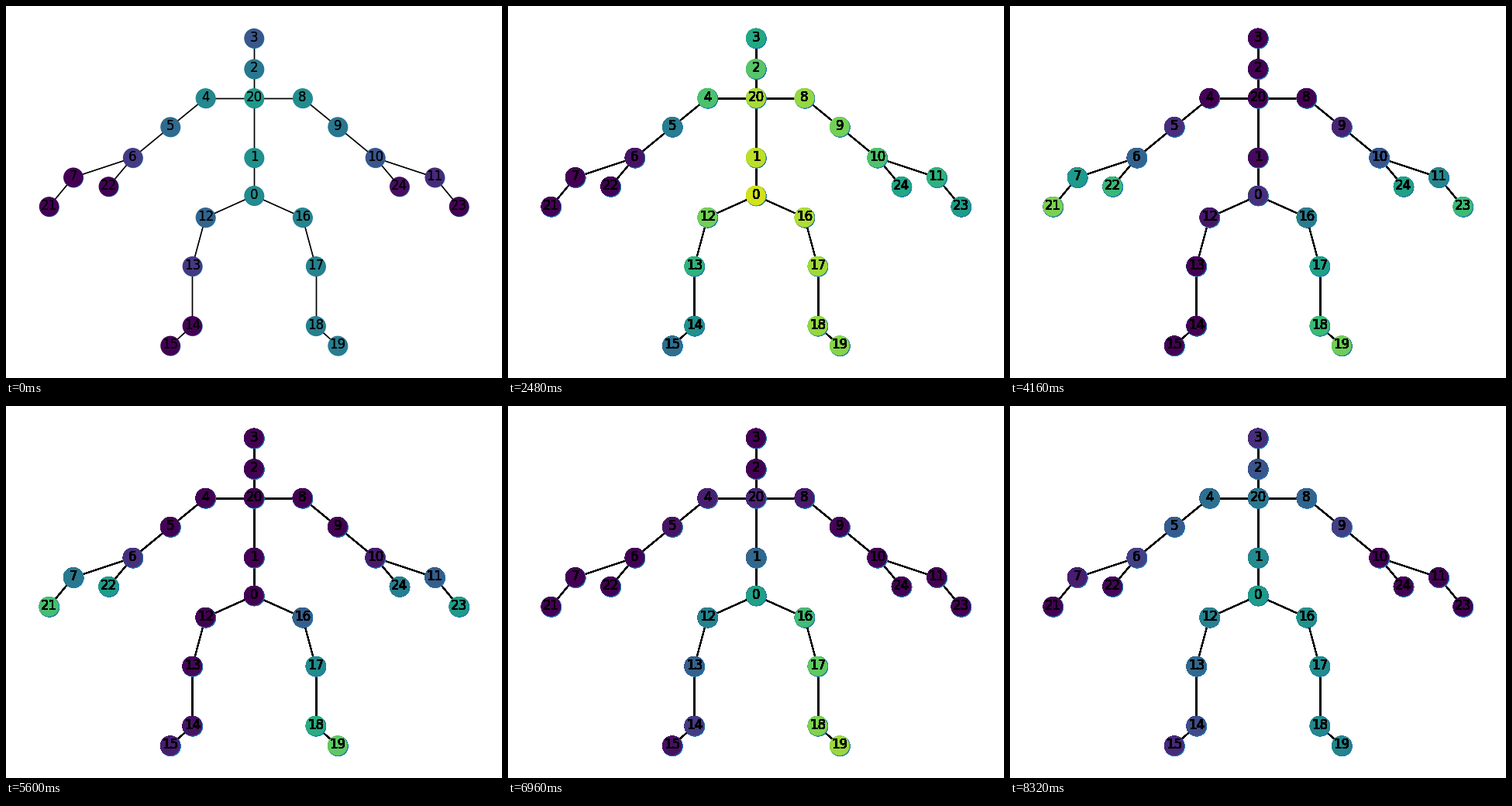
Write a matplotlib script that moves like this. It is 640 by 480 pixels and loops after 8400 ms.

```python
import numpy as np
import matplotlib.pyplot as plt
from matplotlib.animation import FuncAnimation
from matplotlib.collections import LineCollection

W, H, DPI = 640, 480, 100
FRAMES, STEP = 105, 80
CX = W / 2
plt.rcParams["font.family"] = "DejaVu Sans"

# Joint numbers, from the body outwards; thumbs branch off the wrists.
SPINE = (3, 2, 20, 1, 0)
ARMS = (4, 5, 6, 7, 21), (8, 9, 10, 11, 23)
LEGS = (12, 13, 14, 15), (16, 17, 18, 19)
THUMBS = (22,), (24,)

# One half of the body as (distance from the axis, y); the other is mirrored.
SPINE_Y = (41.65, 81.3, 118.9, 195.8, 244.7)
ARM = (62.6, 118.9), (108, 156), (156.4, 195.8), (233.2, 221.2), (264.5, 258.9)
LEG = (62.6, 272.8), (79.6, 335.8), (79.6, 412.8), (108, 438.35)
THUMB = ((187.7, 233),)

# Key poses: neck, pelvis, both hands, both feet. Below zero stays dark.
POSES = {
    0: (.54, .48, -.25, -.05, -.15, .42),
    8: (.93, .94, -.70, .42, .40, .77),
    31: (.87, .93, -.90, .55, .36, .82),
    52: (-.10, .14, .80, .68, -.20, .78),
    70: (-.35, -.05, .70, .55, .08, .75),
    87: (.10, .57, -.10, -.25, .04, .85),
    104: (.40, .55, -.05, -.45, .12, .45),
}


def layout():
    pos = np.zeros((25, 2))
    pos[list(SPINE)] = [(CX, y) for y in SPINE_Y]
    for pair, points in ((ARMS, ARM), (LEGS, LEG), (THUMBS, THUMB)):
        for side, joints in zip((-1, 1), pair):
            pos[list(joints)] = [(CX + side * dx, y) for dx, y in points]
    return pos


def ease(frame):
    """Fractional key index with a soft start and stop on each span."""
    u = np.interp(frame, list(POSES), range(len(POSES)))
    i = np.floor(u)
    t = u - i
    return i + t * t * (3 - 2 * t)


def activation():
    """Spread the key poses from the trunk along each limb."""
    when = ease(np.arange(FRAMES))
    tracks = [np.interp(when, range(len(POSES)), v)
              for v in zip(*POSES.values())]
    neck, pelvis = tracks[:2]
    hands, feet = tracks[2:4], tracks[4:]
    out = np.zeros((FRAMES, 25))

    def spread(joints, root, tip, bend):
        for i, joint in enumerate(joints, 1):
            out[:, joint] = root + (tip - root) * (i / len(joints)) ** bend

    spread((2, 3), neck, neck - .27, 1)
    spread((1, 0), neck, pelvis, 1)
    out[:, 20] = neck
    for arm, thumb, hand in zip(ARMS, THUMBS, hands):
        spread(arm, neck, hand, 1.5)
        out[:, thumb[0]] = out[:, arm[-2:]].mean(axis=1)
    for leg, foot, bend in zip(LEGS, feet, (1, .6)):
        spread(leg, pelvis, foot, bend)
    return out.clip(0, 1)


def layer(z):
    ax = fig.add_axes([0, 0, 1, 1], zorder=z)
    ax.set(xlim=(0, W), ylim=(H, 0))
    ax.axis("off")
    return ax


def overdraw(n):
    """Thicken black ink as if it had been drawn n times."""
    def apply(img, dpi):
        img = img.copy()
        img[..., :3] = 0
        img[..., 3] = 1 - (1 - img[..., 3]) ** n
        return img, 0, 0
    return apply


fig = plt.figure(figsize=(W / DPI, H / DPI), dpi=DPI, facecolor="white")
edge_ax, node_ax, text_ax = (layer(z) for z in (1, 2, 3))

pos = layout()
chains = [SPINE]
for arm, thumb, leg in zip(ARMS, THUMBS, LEGS):
    chains += [(20, *arm), (arm[2], *thumb), (0, *leg)]
bones = [pos[list(pair)] for c in chains for pair in zip(c, c[1:])]
edge_ax.add_collection(LineCollection(bones, colors="black", linewidths=1),
                       autolim=False)

# Each pass lays a blue disc, slightly low and right, under the coloured one.
BLUE = plt.matplotlib.colors.to_rgba("#1f78b4")
discs = np.concatenate([pos + .6, pos])
tints = plt.get_cmap("viridis")(activation())
tints = np.concatenate([np.full_like(tints, BLUE), tints], axis=1)
nodes = node_ax.scatter(*discs.T, s=300, c=tints[0])

for joint, (x, y) in enumerate(pos):
    text_ax.text(x, y - 1, str(joint), size=12, color="black",
                 ha="center", va="center")


def update(frame):
    # Passes pile up, so rims keep older colours and ink grows heavier.
    n = frame + 1
    nodes.set_offsets(np.tile(discs, (n, 1)))
    nodes.set_facecolor(tints[:n].reshape(-1, 4))
    for ax in (edge_ax, text_ax):
        ax.set_agg_filter(overdraw(n + 1))
    return [nodes]


anim = FuncAnimation(fig, update, frames=FRAMES, interval=STEP,
                     init_func=lambda: update(0), repeat=True, repeat_delay=0)
plt.show()
```
